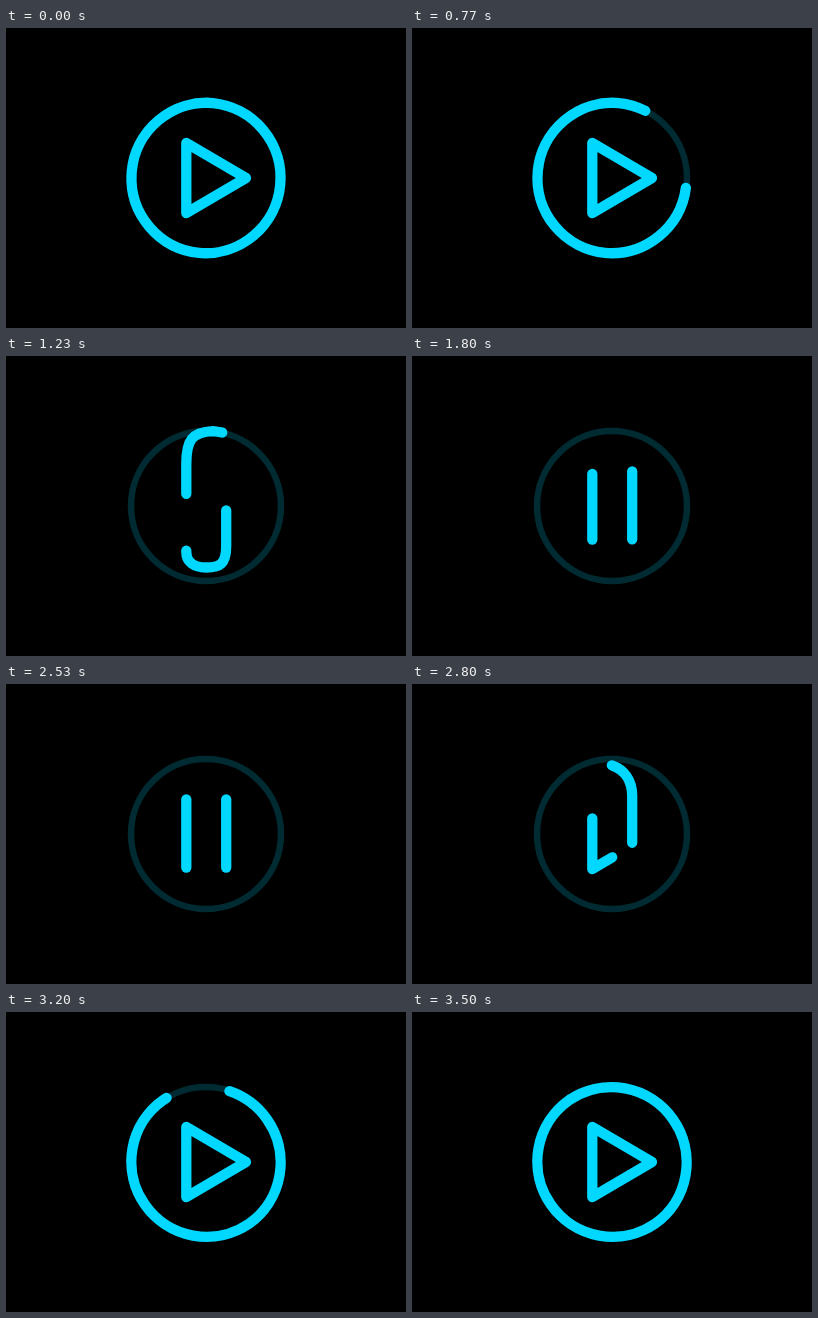
These frames come from a looping animation (400x300 px, 4460 ms). An HTML page:

```html
<!DOCTYPE html>
<html lang="en">
<head>
<meta charset="utf-8">
<title>Play and pause</title>
<style>
html, body { margin: 0; width: 100%; height: 100%; overflow: hidden; background: #000; }
svg { display: block; width: 100vw; height: 100vh; }
path, circle { fill: none; }
path { stroke: #00d8ff; stroke-width: 10.3; stroke-linecap: round; stroke-linejoin: round; }
circle { stroke: #002b33; stroke-width: 6.5; }
</style>
</head>
<body>
<svg viewBox="0 0 400 300">
  <circle cx="200" cy="150" r="75"/>
  <g id="toPause"></g>
  <g id="toPlay"></g>
</svg>
<script>
const LOOP = 4460;
const RADIUS = 75.3;
const RING = 2 * Math.PI * RADIUS;
const BAR = 68;

const triangle = 'L180.3 185 L240 150 L180.3 115 ';
const ring = (x, y) => {
  const arc = (ax, ay) => `A${RADIUS} ${RADIUS} 0 0 0 ${ax} ${ay} `;
  return arc(400 - x, 300 - y) + arc(x, y);
};

function addPath(group, d) {
  const el = document.createElementNS('http://www.w3.org/2000/svg', 'path');
  el.setAttribute('d', d);
  group.append(el);
  return { el, length: el.getTotalLength() };
}

const toPause = document.getElementById('toPause');
const toPlay = document.getElementById('toPlay');

// Each stroke is a dash that slides along one long track.
const ringToBar = addPath(toPause,
  'M207 75.03 ' + ring(207, 75.03).repeat(3) + 'C186 76 180.3 84 180.3 108 V183.5');
const triangleToBar = addPath(toPause,
  'M180.3 115 ' + triangle.repeat(6) +
  'V196 C180.3 206 188 211.5 200 211.5 C214 211.5 220.2 208 220.2 190 V115.5');
const barToRing = addPath(toPlay,
  'M220.2 183.5 V112 C220.2 76 180 72 157 88.19 ' + ring(157, 88.19));
const barToTriangle = addPath(toPlay,
  'M180.3 115 ' + triangle.repeat(2));

// Ease in until mid, ease out until end, each with its own power.
function ease(t, start, mid, end, powIn = 3, powOut = 3) {
  if (t <= start) return 0;
  if (t >= end) return 1;
  return t < mid
    ? 0.5 * ((t - start) / (mid - start)) ** powIn
    : 1 - 0.5 * ((end - t) / (end - mid)) ** powOut;
}

const mix = (a, b, p) => a + (b - a) * p;

function dash(path, tail, head) {
  path.el.setAttribute('stroke-dasharray', `${head - tail} 9999`);
  path.el.setAttribute('stroke-dashoffset', -tail);
}

function draw(t) {
  const playing = t >= 2500;
  toPause.style.display = playing ? 'none' : '';
  toPlay.style.display = playing ? '' : 'none';

  if (playing) {
    const head = ease(t, 2540, 3027, 3500);
    const tail = ease(t, 2540, 2920, 3300);
    const end = barToRing.length;
    dash(barToRing, mix(0, end - RING, tail), mix(BAR, end, head));
    dash(barToTriangle, mix(0.5, 117, tail), mix(BAR + 0.5, 388, head));
  } else {
    const p = ease(t, 284, 907, 1800, 3, 5.06);
    const ringEnd = ringToBar.length;
    const triEnd = triangleToBar.length;
    dash(ringToBar, mix(120, ringEnd - BAR, p), mix(120 + RING, ringEnd, p));
    dash(triangleToBar, mix(10, triEnd - BAR, p), mix(701, triEnd, p));
  }
}

const began = performance.now();
function tick() {
  draw((performance.now() - began) % LOOP);
  requestAnimationFrame(tick);
}
tick();
</script>
</body>
</html>
```
